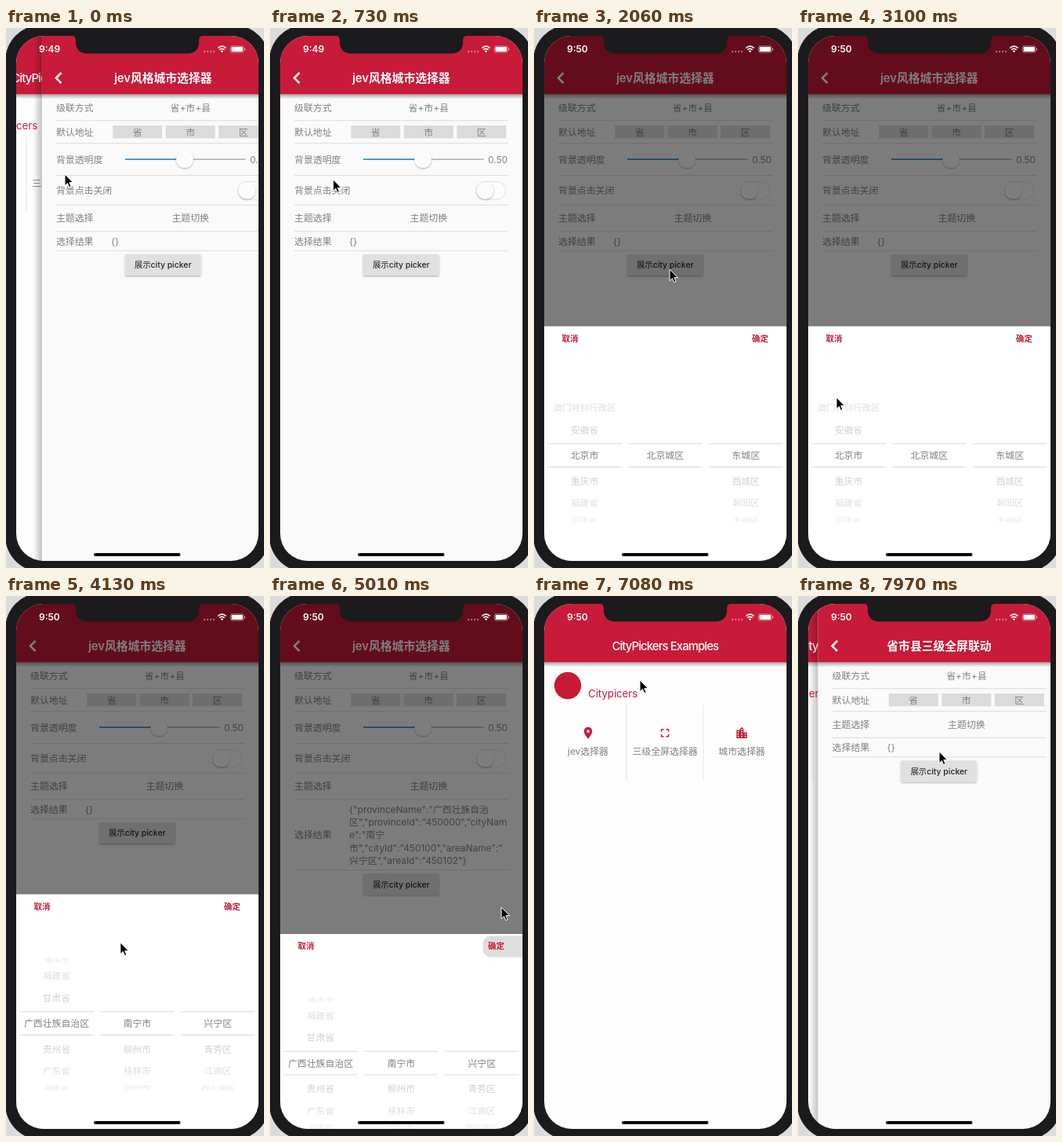
An HTML page for the animation above (8 s loop, 329 px wide and 687 px high).

```html
<!DOCTYPE html>
<html lang="zh-CN">
<head>
<meta charset="utf-8">
<title>City picker demo</title>
<style>
  html, body { margin: 0; width: 100%; height: 100%; overflow: hidden; background: #dcdcdc; }
  svg { display: block; width: 329px; height: 687px; }
  text { font-family: Inter, 'Noto Sans CJK SC', 'Noto Sans CJK', sans-serif; }
</style>
</head>
<body>
<svg viewBox="0 0 329 687">
  <defs>
    <clipPath id="screen"><rect x="13" y="10" width="309" height="668" rx="35"/></clipPath>
    <clipPath id="drum"><rect x="13" y="457" width="309" height="174"/></clipPath>
    <linearGradient id="down" x2="0" y2="1">
      <stop stop-opacity=".32"/><stop offset="1" stop-opacity="0"/>
    </linearGradient>
    <linearGradient id="side">
      <stop stop-opacity="0"/><stop offset="1" stop-opacity=".24"/>
    </linearGradient>
    <filter id="soft" x="-30%" y="-50%" width="160%" height="200%">
      <feDropShadow dx="0" dy="1" stdDeviation=".9" flood-opacity=".35"/>
    </filter>
    <filter id="lift" x="-30%" y="-50%" width="160%" height="220%">
      <feDropShadow dx="0" dy="2.5" stdDeviation="2" flood-opacity=".4"/>
    </filter>
  </defs>
  <rect x="-1" y="-4" width="337" height="696" rx="46" fill="#1b1b1d"/>
  <g id="app" clip-path="url(#screen)"></g>
  <path d="M83 9Q89 10 89 16V18Q89 32.4 104 32.4H231Q246 32.4 246 18V16Q246 10 252 9Z" fill="#1b1b1d"/>
  <g fill="#fff">
    <text id="clock" x="42" y="31" font-size="12" font-weight="600"></text>
    <g opacity=".4">
      <circle cx="253" cy="30" r="1.2"/><circle cx="257" cy="30" r="1.2"/>
      <circle cx="261" cy="30" r="1.2"/><circle cx="265" cy="30" r="1.2"/>
    </g>
    <path d="M270.3 25.5Q275.5 20.8 280.7 25.5M272.3 27.7Q275.5 24.9 278.7 27.7" fill="none" stroke="#fff" stroke-width="1.6"/>
    <path d="M273.7 29.2Q275.5 27.8 277.3 29.2L275.5 31.2Z"/>
    <rect x="286.4" y="22.9" width="16.6" height="8.2" rx="2.2" fill="none" stroke="#fff" stroke-opacity=".6" stroke-width=".8"/>
    <rect x="287.6" y="24.1" width="14.2" height="5.8" rx="1.2"/>
    <rect x="303.8" y="25.6" width="1.1" height="2.8" rx=".5" opacity=".6"/>
  </g>
  <rect x="112" y="668" width="110.5" height="4" rx="2"/>
  <path id="cursor" d="M0 0V14.6L3.4 11.5 5.6 16.6 8 15.6 5.8 10.6H10.4Z" stroke="#fff"/>
</svg>
<script>
// The picture advances in ticks; LEAD lets each tick start a little early.
const LOOP = 8000, TICK = 147.5, LEAD = 13;
const RED = '#c81b39', GREY = '#828282', WIDTH = 309;
const AT = { clock: 8, press: 12, open: 14, spin: 22, cities: 27, confirm: 33, chosen: 34, closed: 35, pop: 45, home: 48, push: 52 };

// Pointer moves: first tick, last tick, destination.
const START = [75, 186];
const MOVES = [[4, 11, 173, 307], [17, 21, 49, 470], [25, 32, 295, 396], [38, 41, 131, 113],
  [41, 44, 29, 65], [46, 48, 135, 107], [48, 51, 180, 198]];

const PROVINCES = '澳门特别行政区 安徽省 北京市 重庆市 福建省 甘肃省 广西壮族自治区 贵州省 广东省 海南省 河北省'.split(' ');
const BEFORE = [['北京城区'], ['东城区', '西城区', '朝阳区', '丰台区']];
const AFTER = [['南宁市', '柳州市', '桂林市', '梧州市'], ['兴宁区', '青秀区', '江南区', '西乡塘区']];
const RESULT = ['{"provinceName":"广西壮族自治', '区","provinceId":"450000","cityNam', 'e":"南宁',
  '市","cityId":"450100","areaName":"', '兴宁区","areaId":"450102"}'];

const PIN = 'M12 2C8.1 2 5 5.1 5 9c0 5.25 7 13 7 13s7-7.75 7-13c0-3.9-3.1-7-7-7zm0 9.5a2.5 2.5 0 1 1 0-5 2.5 2.5 0 0 1 0 5z';
const EXPAND = 'M7 14H5v5h5v-2H7zM5 10h2V7h3V5H5zM17 17h-3v2h5v-5h-2zM14 5v2h3v3h2V5z';
let TOWN = 'M15 11V5l-3-3-3 3v2H3v14h18V11z';
for (let x = 5; x < 18; x += 6) {
  for (let y = 5; y < 18; y += 4) {
    if (x === 11 || y > (x === 5 ? 5 : 9)) TOWN += `M${x} ${y}v2h2v-2z`;
  }
}

const ease = p => { p = Math.min(1, Math.max(0, p)); return p * p * (3 - 2 * p); };

function pointer(k) {
  return MOVES.reduce(([x, y], [a, b, tx, ty]) => {
    const p = ease((k - a) / (b - a));
    return [x + (tx - x) * p, y + (ty - y) * p];
  }, START);
}

// Left edge of a page n ticks after it is pushed
function pushed(n) {
  const x = WIDTH * Math.exp(-1.6 * Math.max(0, n));
  return x < 2 ? 0 : x;
}
function slide(k) {
  if (k < AT.pop) return pushed(k + 1.4);
  return k < AT.home ? WIDTH * ease((k - AT.pop) / 3) : pushed(k - AT.push);
}

const text = (x, y, s, size = 11.9, fill = GREY, extra = '') =>
  `<text x="${x}" y="${y}" font-size="${size}" fill="${fill}" ${extra}>${s}</text>`;
const MID = 'text-anchor="middle"';
// y is the middle of the line
const label = (x, y, s, extra) => text(x, y + 4.4, s, 11.9, GREY, extra);
const rect = (x, y, w, h, fill, extra = '') =>
  `<rect x="${x}" y="${y}" width="${w}" height="${h}" fill="${fill}" ${extra}/>`;
const screen = (fill, extra) => rect(13, 10, WIDTH, 668, fill, extra);
const rule = y => rect(31, y, 273, 1, '#dcdcdc');
const knob = (x, y) => `<circle cx="${x}" cy="${y}" r="10.8" fill="#fcfcfc" filter="url(#soft)"/>`;
const shift = (x, y, s) => `<g transform="translate(${x} ${y})">${s}</g>`;

const bar = (title, extra) => rect(13, 84.4, WIDTH, 6, 'url(#down)') + rect(13, 10, WIDTH, 74.4, RED) +
  text(167.3, 69, title, 14.8, '#fff', `${MID} ${extra}`);

function home() {
  const cells = [[PIN, 'jev选择器'], [EXPAND, '三级全屏选择器'], [TOWN, '城市选择器']];
  return screen('#fdfdfd') + bar('CityPickers Examples', 'font-weight="500" letter-spacing="-.85"') +
    `<circle cx="43" cy="114" r="17.2" fill="${RED}"/>` + text(69, 129, 'Citypicers', 13.2, RED) +
    cells.map(([icon, name], i) => {
      const x = 69 + 98 * i;
      return (i ? rect(x - 49.5, 138, 1, 97, '#e6e6e6') : '') +
        `<path transform="translate(${x - 9} 165.3) scale(.75)" fill="${RED}" fill-rule="evenodd" d="${icon}"/>` +
        label(x, 197.8, name, MID);
    }).join('');
}

function controls() {
  return label(31, 167.5, '背景透明度') + rect(119, 166.3, 153.5, 1.6, '#b5b5b5') +
    rect(119, 166.3, 76, 1.6, '#2a93e0') + knob(195, 167) + label(290.5, 167.5, '0.50', MID) + rule(187) +
    label(31, 206.8, '背景点击关闭') +
    rect(263, 195.5, 37.5, 22.5, '#fcfcfc', 'rx="11.25" stroke="#e0e0e0"') + knob(274.3, 206.7) + rule(224.7);
}

function page(title, full, result, press) {
  const y = full ? 242 : 163.5;
  const top = y + 29.3, grow = (result.length - 1) * 16.3;
  const end = top + grow + 11.5;
  const places = ['省', '市', '区'].map((s, i) =>
    rect(103.2 + 67.5 * i, 124, 63, 16.3, '#dbdbdb') + label(134.7 + 67.5 * i, 132.3, s, MID)).join('');
  return screen('#fafafa') + bar(title, 'font-weight="600"') +
    '<path d="M37.5 57L31 63.6l6.5 6.6" fill="none" stroke="#fff" stroke-width="2.5"/>' +
    label(31, 101.2, '级联方式') + label(202.3, 101.2, '省+市+县', MID) + rule(117.2) +
    label(31, 132.3, '默认地址') + places + rule(146.2) + (full ? controls() : '') +
    label(31, y, '主题选择') + label(202.3, y, '主题切换', MID) + rule(y + 16.3) +
    label(31, top + grow / 2, '选择结果') +
    result.map((s, i) => label(101, top + i * 16.3, s)).join('') + rule(end) +
    rect(119, end + 5.3, 96.5, 27, press ? '#d2d2d2' : '#e0e0e0', `rx="1.5" filter="url(#${press ? 'lift' : 'soft'})"`) +
    text(167.2, end + 22.6, '展示city picker', 10.4, '#222', `${MID} font-weight="500"`);
}

function wheel(x, items, pos) {
  const rows = items.map((s, i) => {
    const d = i - pos, a = d * 16 * Math.PI / 180;
    if (Math.abs(d) > 3.6) return '';
    const k = 1 / (1 + .27 * (1 - Math.cos(a)));
    const fade = Math.abs(d) < .5 ? 1 : .45 - .09 * Math.abs(d);
    return `<g transform="translate(${x} ${544 + 119 * Math.sin(a) * k}) scale(${k} ${k * Math.cos(a)})" opacity="${fade}">` +
      label(0, 0, s, MID) + '</g>';
  }).join('');
  return rows + rect(x - 47, 528.3, 94, 1, '#dadada') + rect(x - 47, 558, 94, 1, '#dadada');
}

function sheet(k) {
  const [cities, areas] = k >= AT.cities ? AFTER : BEFORE;
  const bold = 'font-weight="600"';
  const ripple = k >= AT.confirm ? rect(271.5, 382, 64, 27, '#dedede', 'rx="10"') : '';
  const panel = rect(13, 379.5, WIDTH, 300, '#fff') + ripple +
    text(35.5, 398.6, '取消', 10.4, RED, bold) + text(278, 398.6, '确定', 10.4, RED, bold) +
    '<g clip-path="url(#drum)">' + wheel(64.5, PROVINCES, 2 + 4 * ease((k - AT.spin) / 4)) +
    wheel(167.3, cities, 0) + wheel(270.2, areas, 0) + '</g>';
  return screen('#000', 'opacity=".5"') + shift(0, k >= AT.chosen ? 50.5 : 0, panel);
}

function scene(k) {
  const x = slide(k), first = k < AT.home;
  const result = first && k >= AT.chosen ? RESULT : ['{}'];
  const press = k >= AT.press && k < AT.open;
  let out = '';
  if (x > 0) out += shift((x - WIDTH) / 3, 0, home());
  if (x < WIDTH) {
    out += shift(x, 0, (x > 0 ? rect(2, 10, 11, 668, 'url(#side)') : '') +
      page(first ? 'jev风格城市选择器' : '省市县三级全屏联动', first, result, press));
  }
  return k >= AT.open && k < AT.closed ? out + sheet(k) : out;
}

const get = id => document.getElementById(id);
let shown = -1;
function tick() {
  const k = Math.floor((performance.now() % LOOP + LEAD) / TICK);
  if (k !== shown) {
    shown = k;
    get('app').innerHTML = scene(k);
    get('clock').textContent = k < AT.clock ? '9:49' : '9:50';
    get('cursor').setAttribute('transform', `translate(${pointer(k).join(' ')})`);
  }
  requestAnimationFrame(tick);
}
tick();
</script>
</body>
</html>
```
